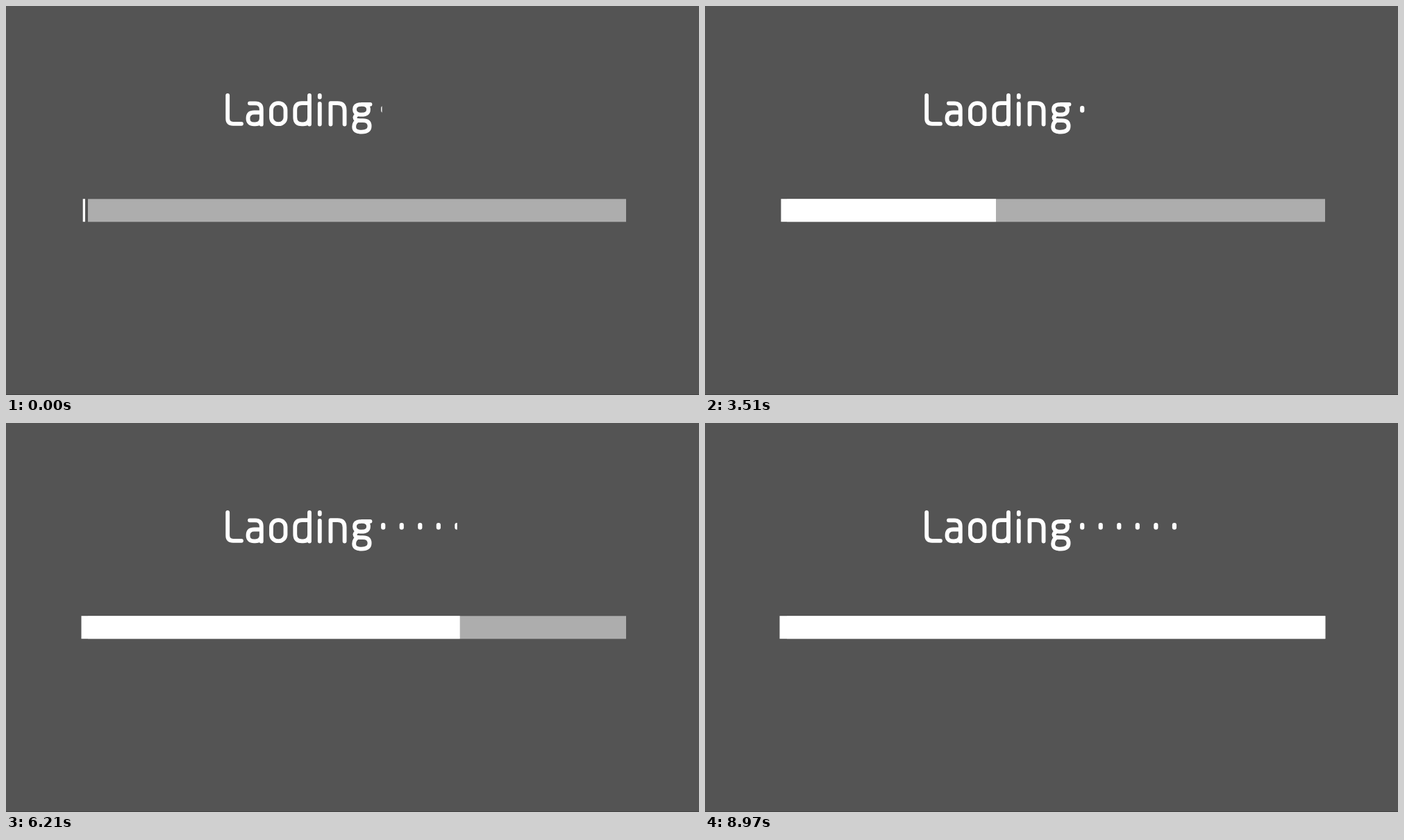
Recreate the animation shown at these times as an HTML page. Size 998 by 561 pixels, loop 9000 ms.

```html
<!DOCTYPE html>
<html lang="en">
<head>
<meta charset="utf-8">
<title>Laoding</title>
<style>
  html, body { margin: 0; width: 100%; height: 100%; overflow: hidden; background: #545454; }
  svg { display: block; width: 998px; height: 561px; }
  .word { fill: none; stroke: #fff; stroke-width: 5.8; stroke-linecap: round; stroke-linejoin: round; }
</style>
</head>
<body>
<svg viewBox="0 0 998 561" role="img" aria-label="Laoding">
  <defs>
    <clipPath id="wipe"><rect id="reveal" x="530" y="130" height="40"/></clipPath>
  </defs>
  <rect width="998" height="561" fill="#545454"/>
  <rect y="560" width="998" height="1" fill="#424242"/>
  <!-- rounded lettering, one path per letter -->
  <g class="word">
    <path d="M319.2 128.8V162Q319.2 169.8 327 169.8H339"/>
    <path d="M351 140.3H359Q367.8 140.3 367.8 149V170.7M367.8 153.5H357.5Q348.5 153.5 348.5 162T357.5 170.3H359Q367.8 170.3 367.8 162"/>
    <rect x="382" y="140.2" width="20.5" height="30" rx="9.5"/>
    <path d="M437 129V170.6M437 140.2H426Q416.3 140.2 416.3 150V160.5Q416.3 170.3 426 170.3H428Q437 170.3 437 161"/>
    <path d="M451.8 129V131.5M451.8 141V170.6"/>
    <path d="M467.5 140.2V170.6M467.5 140.2H477.5Q487.6 140.2 487.6 150.5V170.6"/>
    <path d="M524.5 141.8H512Q502 141.8 502 149.2T512 156.7T522 149.2T512 141.8M506.5 156Q499.5 160.5 504.5 164.3Q506 165.2 514 165.2Q523.6 165.2 523.6 173.3T512.3 181.6T501.2 174Q501.2 168 506.5 165"/>
  </g>
  <g id="dots" fill="#fff" clip-path="url(#wipe)"></g>
  <rect x="118" y="278.3" width="775" height="33" fill="#adadad"/>
  <rect id="bar" y="278.2" height="33" fill="#fff"/>
</svg>
<script>
  const $ = id => document.getElementById(id);
  const LOOP = 9000, STEP = 30, LAST = LOOP - STEP;
  const SWEEP = 3633, SPEED = 0.1025; // dots wipe out and back at constant speed

  for (let i = 0; i < 6; i++) {
    const dot = document.createElementNS('http://www.w3.org/2000/svg', 'rect');
    const attrs = { x: 540.1 + 26.55 * i, y: 144, width: 6.2, height: 9.8, rx: 3 };
    for (const key in attrs) dot.setAttribute(key, attrs[key]);
    $('dots').append(dot);
  }

  function draw(now) {
    const t = Math.floor(now % LOOP / STEP) * STEP;
    const p = t / LAST;
    const left = 110.7 - 3.2 * p, right = 114 + 779.5 * p;
    $('bar').setAttribute('x', left);
    $('bar').setAttribute('width', right - left);

    const phase = t % SWEEP;
    const edge = 541.5 + SPEED * Math.min(phase, SWEEP - phase);
    $('reveal').setAttribute('width', edge - 530);
  }

  const start = performance.now();
  (function tick() {
    draw(performance.now() - start);
    requestAnimationFrame(tick);
  })();
</script>
</body>
</html>
```
